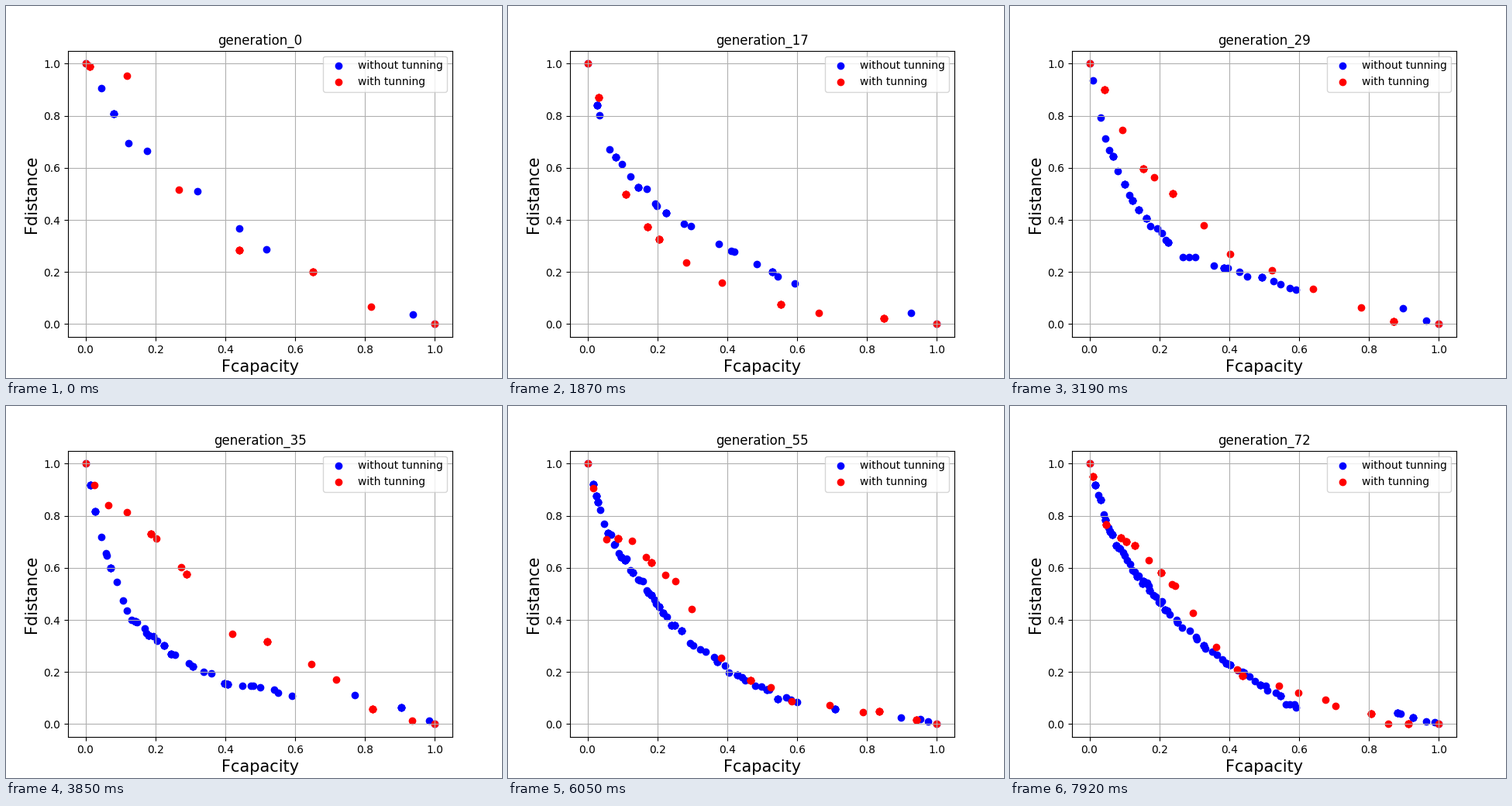
Animation, 640 px wide and 480 px high, one loop 8 s. Source, as a matplotlib script:

```python
import matplotlib.pyplot as plt
import numpy as np
from matplotlib.animation import FuncAnimation

GENERATIONS = 73
LOOP_MS = 8000

# Height of each front above a few knots, at a few key generations.
KNOTS = [0.05, 0.12, 0.25, 0.4, 0.6, 0.85]
KEYS = [0, 10, 23, 35, 44, 55, 72]
BLUE_FRONTS = [
    [0.90, 0.70, 0.62, 0.41, 0.21, 0.10],
    [0.70, 0.62, 0.54, 0.34, 0.16, 0.11],
    [0.70, 0.53, 0.28, 0.25, 0.14, 0.06],
    [0.68, 0.42, 0.27, 0.165, 0.11, 0.10],
    [0.80, 0.53, 0.325, 0.21, 0.09, 0.08],
    [0.76, 0.60, 0.37, 0.21, 0.07, 0.045],
    [0.765, 0.60, 0.39, 0.23, 0.065, 0.05],
]
RED_FRONTS = [
    [0.98, 0.96, 0.55, 0.29, 0.25, 0.04],
    [0.70, 0.385, 0.21, 0.11, 0.09, 0.02],
    [0.91, 0.50, 0.30, 0.18, 0.035, 0.01],
    [0.86, 0.81, 0.645, 0.37, 0.28, 0.03],
    [0.81, 0.77, 0.45, 0.23, 0.125, 0.03],
    [0.72, 0.71, 0.54, 0.21, 0.09, 0.03],
    [0.74, 0.70, 0.52, 0.22, 0.12, 0.012],
]

# Where the population sits along x: (share of points, position).
BLUE_SPREAD = [0, 0.5, 0.92, 0.93, 1], [0.01, 0.23, 0.6, 0.87, 1]
RED_SPREAD = [0, 0.5, 1], [0.01, 0.3, 0.95]


def front_height(x, fronts, generation):
    """Front at this generation, blended between the key generations."""
    heights = [np.interp(generation, KEYS, column) for column in zip(*fronts)]
    return np.interp(x, [0, *KNOTS, 1], [1, *heights, 0])


def population(generation, fronts, spread, count, rng):
    """Evenly spread, slightly jittered points; some occur several times."""
    share = (np.arange(count) + rng.random(count)) / count
    x = np.interp(share, *spread)
    y = front_height(x, fronts, generation) + rng.normal(0, 0.006, count)
    points = np.column_stack([x, np.clip(y, 0, 1)])
    points = np.repeat(points, rng.choice([1, 1, 4], count), axis=0)
    return np.vstack([[0, 1], points, [1, 0]])


fig, ax = plt.subplots(figsize=(6.4, 4.8), dpi=100)
blue = ax.scatter([], [], c="b", label="without tunning")
red = ax.scatter([], [], c="r", label="with tunning")
ax.set_xlim(-0.05, 1.05)
ax.set_ylim(-0.05, 1.05)
ax.set_xlabel("Fcapacity", fontsize=15)
ax.set_ylabel("Fdistance", fontsize=15)
ax.grid(True)
ax.legend(loc="upper right")
title = ax.set_title("generation_0")


def draw(generation):
    rng = np.random.default_rng(generation)
    blue.set_offsets(population(generation, BLUE_FRONTS, BLUE_SPREAD,
                                8 + int(0.8 * generation), rng))
    red.set_offsets(population(generation, RED_FRONTS, RED_SPREAD,
                               6 + generation // 5, rng))
    title.set_text(f"generation_{generation}")
    return blue, red, title


anim = FuncAnimation(fig, draw, frames=GENERATIONS,
                     interval=LOOP_MS / GENERATIONS, repeat=True,
                     repeat_delay=0)
plt.show()
```
